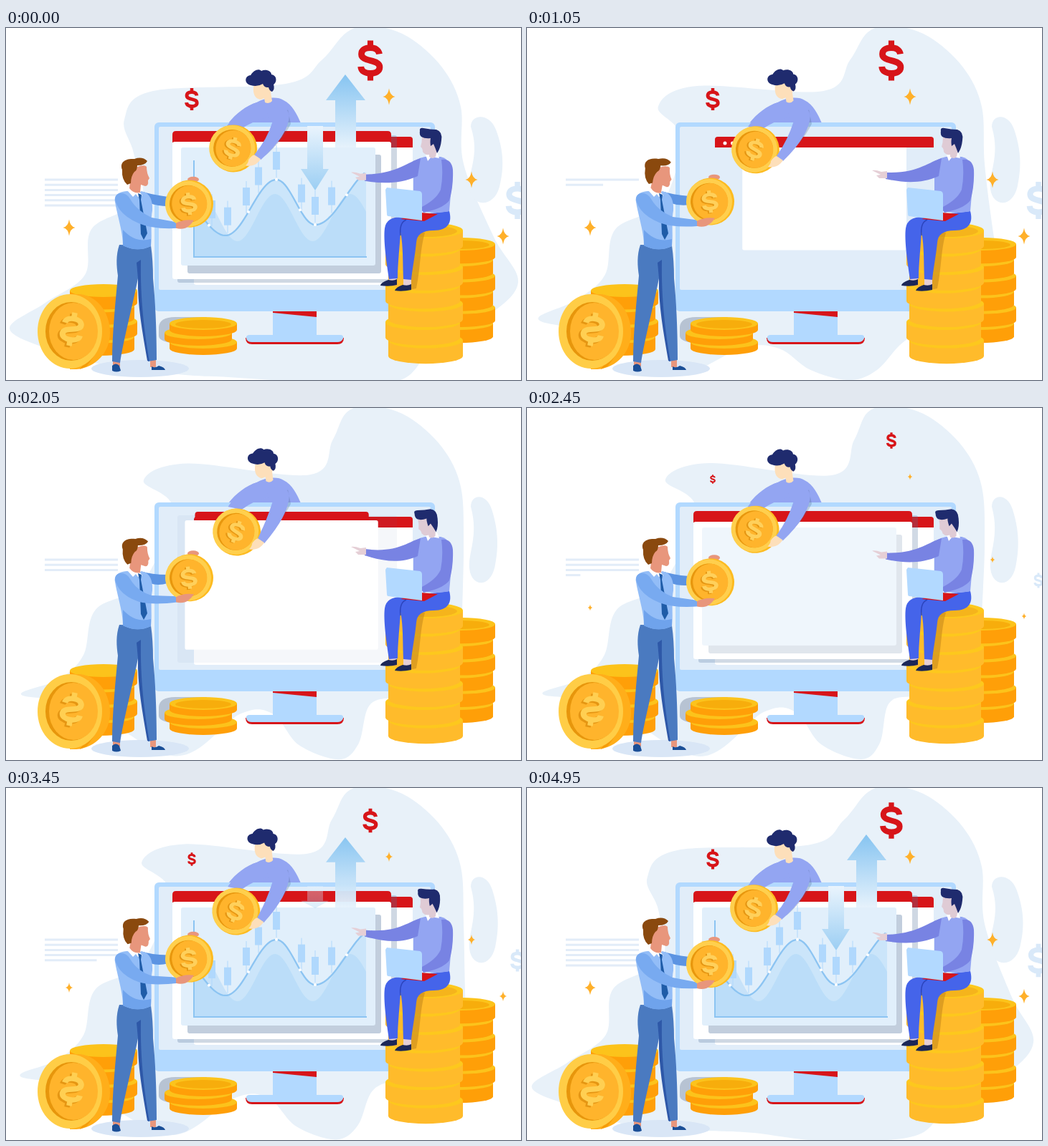
An HTML page for the animation above (5050 ms loop, 718 px wide and 492 px high).

```html
<!DOCTYPE html>
<html lang="en">
<head>
<meta charset="utf-8">
<title>Investment team</title>
<style>
  html, body { margin: 0; width: 100%; height: 100%; overflow: hidden; background: #fff; }
  svg { display: block; width: 718px; height: 492px; }
</style>
</head>
<body>
<svg viewBox="0 0 718 492">
  <defs>
    <g id="dollar" fill="none">
      <path stroke-width="5.4" d="M7.7-5.6C7.2-9.3 4-11 0-11C-4.5-11-7.7-9-7.7-5.6C-7.7-2-4-1 0 0S8 2 8 5.7C8 9.2 4.5 11 0 11C-4.5 11-8 9-8.2 5.2"/>
      <path stroke-width="5" d="M0-17.300v6M0 11.300v6"/>
    </g>
    <path id="star" fill="#ffb02a" d="M0-11.500Q1.300-1.500 8.500 0Q1.300 1.500 0 11.500Q-1.300 1.500-8.500 0Q-1.300-1.500 0-11.500Z"/>
    <g id="coin">
      <circle r="33" cx="1" fill="#fdbb20"/>
      <circle r="32" cx="-1" fill="#ffcf4d"/>
      <circle r="26" cx="-1" fill="#e8970d"/>
      <ellipse rx="24.500" ry="25.500" cx=".8" fill="#ffb42c"/>
      <use href="#dollar" stroke="#e59613" transform="translate(-2 1) scale(1.050 .9)"/>
      <use href="#dollar" stroke="#ffd05b" transform="scale(1.050 .9)"/>
    </g>
    <linearGradient id="upFill" x2="0" y2="1">
      <stop stop-color="#86c4f1"/><stop offset="1" stop-color="#e6f2fc"/>
    </linearGradient>
    <linearGradient id="downFill" x2="0" y2="1">
      <stop stop-color="#eaf4fd"/><stop offset="1" stop-color="#9bcef3"/>
    </linearGradient>
  </defs>

  <path id="blob" fill="#e8f1f9"/>
  <path id="sideBlob" fill="#e8f1f9" d="M648 138C648 120 674 118 683 142C692 166 696 190 688 222C680 252 650 250 646 226C642 204 662 180 648 138Z"/>
  <g id="lines" stroke="#e2ecf8" stroke-width="3"></g>

  <!-- man behind the monitor -->
  <path fill="#93a5f2" d="M350 104C360 97 379 95 387 101C399 107 406 121 411 133H310C320 120 335 108 350 104Z"/>
  <g id="headTop">
    <path fill="#fddfba" d="M345 82C344 92 347 99 355 100L360 98L361 104Q367 107 371 102L369 90L373 84L366 75L347 78Z"/>
    <path fill="#1f2b6e" d="M341 80C332 78 332 67 341 66C345 59 352 56 356 60C362 57 370 60 370 65C378 66 378 76 373 79Q375 86 371 89Q367 88 366 83Q360 84 358 78Q350 83 341 80Z"/>
  </g>

  <!-- monitor -->
  <rect x="207" y="132" width="391" height="264" rx="6" fill="#b2d9ff"/>
  <rect x="213" y="138" width="379" height="228" rx="2" fill="#e1edf9"/>
  <path fill="#d71519" d="M334 433Q334 442 343 442H462Q471 442 471 433Z"/>
  <path fill="#b2d9ff" d="M372 396H433V429H466Q471 429 470 434Q468 439 462 439H343Q336 439 335 434Q334 429 340 429H372Z"/>
  <path fill="#d71519" d="M372 396H433V404L372 398Z"/>

  <!-- rear window -->
  <rect id="rearBody" x="262" y="160" width="305" height="199" rx="3" fill="#fff"/>
  <path id="rearBar" fill="#d71519" d="M262 167V156Q262 152 266 152H563Q567 152 567 156V167Z"/>
  <path id="rearDots" stroke="#fff" stroke-width="5" stroke-linecap="round" d="M276 161h0M286.500 161h0M297 161h0"/>
  <!-- front window -->
  <rect id="frontShade" x="239" y="150" width="306" height="206" rx="3" fill="#52749b"/>
  <path id="frontBar" fill="#d71519" d="M232 160V149Q232 144 237 144H532Q537 144 537 149V160Z"/>
  <rect id="frontBody" x="232" y="159" width="305" height="192" rx="3" fill="#fff"/>
  <g id="panel">
    <rect x="253" y="177" width="270" height="166" rx="3" fill="#c2cedd"/>
    <rect x="244" y="167" width="271" height="165" rx="3" fill="#e1effb"/>
  </g>
  <g id="chart">
    <path id="backArea" fill="#9bcdf5" opacity=".38"/>
    <path id="frontArea" fill="#a7d4f8" opacity=".38"/>
    <g id="candles" fill="#b0d8fd" stroke="#b0d8fd"></g>
    <path fill="none" stroke="#8cc4f2" stroke-width="2" d="M262 185V320H503"/>
    <path id="curve" fill="none" stroke="#8cc4f2" stroke-width="2.300"/>
    <path id="nodes" stroke="#fff" stroke-width="4" stroke-linecap="round"/>
  </g>
  <path id="up" fill="url(#upFill)" d="M473 65L501 101H488V167H459V101H446Z"/>
  <path id="down" fill="url(#downFill)" d="M420 137H442V197H450L431 227L411 197H420Z"/>

  <!-- arms over the frame -->
  <path fill="#46607f" opacity=".25" d="M393 114L397 134C388 152 376 166 362 178L350 180Z"/>
  <path id="armTopLeft" fill="#93a5f2"/>
  <use id="coinTop" href="#coin"/>
  <path id="armTopRight" fill="#93a5f2"/>
  <path id="handTop" fill="#fddfba" d="M346 177L355 183C350 190 344 194 334 192Q338 188 338 184Q342 178 346 177Z"/>

  <!-- coin piles and seated man -->
  <path fill="#b7c3d3" d="M213 418Q214 404 236 404H280V440H232Q213 438 213 430Z"/>
  <g id="piles"></g>
  <path fill="#c98a1c" opacity=".6" d="M565 284L584 286C577 310 578 335 572 364L562 366Z"/>
  <path fill="#e5cfd6" d="M534 348h11v7h-11ZM554 347h11v13h-11Z"/>
  <path fill="#1c2757" d="M522 360Q522 356 533 352Q540 354 545 351V359Q535 362 522 360ZM542 367Q544 362 553 359Q560 361 565 358V366Q552 369 542 367Z"/>
  <path fill="#4564ea" d="M618 256C622 270 618 283 596 283Q573 283 572 300C570 320 566 340 565 352L554 351C553 330 554 305 550 285C549 305 546 330 546 350L534 351C530 325 526 295 528 280Q530 264 552 264Z"/>
  <path fill="none" stroke="#2c45bd" stroke-width="1.500" d="M550 290Q548 272 558 268"/>
  <path fill="#93a5f2" d="M584 180Q572 182 568 190V228L580 256Q600 260 618 256L622 210Q623 184 606 180Z"/>
  <path id="armPoint" fill="#7883e3"/>
  <path id="handPoint" fill="#e5cfd6" d="M502 203V213L491 213L487 209L493 208L481 202Q486 201 494 204Z"/>
  <path fill="#7883e3" d="M607 184Q621 182 623 198Q624 222 618 241Q610 252 582 258L578 251Q600 240 606 226Q610 205 607 184Z"/>
  <path fill="#fff" d="M585 177L601 174L604 182L593 180L588 186Z"/>
  <g id="headSeat">
    <path fill="#dfcbd5" d="M580 152Q580 160 578 166Q581 168 581 173Q584 178 590 177V180Q595 184 599 180L603 160L594 150Z"/>
    <path fill="#1f2b6e" d="M577 144Q576 139 582 140Q592 142 600 142Q609 145 607 157Q606 168 601 175Q599 169 596 162L592 165Q591 158 592 154Q584 155 579 152Q576 149 577 144Z"/>
  </g>
  <path fill="#d71519" d="M578 258L602 260L583 270L550 267Z"/>
  <path fill="#b2d9ff" d="M531 223L577 228Q580 229 580 233V269L533 263Q531 263 531 260L529 226Z"/>

  <!-- large coin -->
  <g id="leftPile"></g>
  <path fill="#ffae1a" d="M89 372H104C130 376 145 400 145 426S126 475 98 477H89Z"/>
  <path fill="#f59c08" d="M108 377C137 395 142 440 112 473L103 477Q135 432 108 377Z"/>
  <ellipse cx="89" cy="424" rx="45" ry="52" fill="#ffcd46"/>
  <ellipse cx="91" cy="424" rx="36" ry="41" fill="#e7960c"/>
  <ellipse cx="94" cy="424" rx="34" ry="40" fill="#ffb42c"/>
  <use href="#dollar" stroke="#e59613" transform="translate(89 423) rotate(10) scale(-1.500 1.350)"/>
  <use href="#dollar" stroke="#ffcf52" transform="translate(92 421) rotate(10) scale(-1.500 1.350)"/>

  <!-- standing man -->
  <ellipse cx="187" cy="476" rx="68" ry="12" fill="#d9e6f6"/>
  <path fill="#e8967c" d="M149 464h10v9h-10ZM201 460h8v14h-8Z"/>
  <path fill="#1b4f97" d="M148 472Q153 467 158 472L160 479Q154 482 148 479ZM203 473Q208 476 213 472Q221 474 222 478H203Z"/>
  <path fill="#4a7ac0" d="M158 303C153 318 154 332 156 346C153 380 148 425 148 466L159 468C164 435 176 390 184 350C185 385 192 430 198 466L210 464C210 420 208 380 205 350Q205 325 202 304Z"/>
  <path fill="#2e58a8" d="M182 328L188 324C187 380 193 425 200 466L197 465C190 425 183 385 184 350Z"/>
  <path id="armFar" fill="#5c94e2"/>
  <path fill="#93bdf7" d="M168 228C157 229 150 234 152 243C155 262 163 285 163 304Q183 314 202 305C204 290 201 270 204 255Q205 235 193 229Z"/>
  <path fill="#6fa3ec" d="M163 282Q180 301 202 295V305Q183 314 163 304Z"/>
  <path fill="#fff" d="M170 228L174 223L187 230L190 234L184 236L181 232L177 236Z"/>
  <path fill="#1f5ca8" d="M184 231L189 233L188 240L197 287L192 296L188 288L186 240Z"/>
  <g id="headStand">
    <path fill="#e8967c" d="M176 203C178 193 193 190 196 194Q196 203 200 210L198 213Q199 221 194 221L188 219L187 230Q178 232 172 224L174 208Z"/>
    <path fill="#8a490e" d="M162 198C158 188 166 182 179 183Q190 179 197 186Q194 192 183 192Q183 199 179 201Q174 207 174 217L169 219Q161 212 162 198Z"/>
  </g>
  <path id="armNear" fill="#78aaf0"/>
  <g id="held">
    <ellipse cx="261" cy="212" rx="8" ry="4" fill="#e8967c"/>
    <use href="#coin" transform="translate(255 246) rotate(-6)"/>
    <path fill="#e8967c" d="M237 273Q248 267 262 269Q257 277 250 280Q243 282 237 280Z"/>
  </g>

  <!-- pulsing signs and sparkles -->
  <g transform="translate(508 45.500) scale(1.620)" stroke="#d71519"><use class="pulse" href="#dollar"/></g>
  <g transform="translate(259 99.500) scale(.9)" stroke="#d71519"><use class="pulse" href="#dollar"/></g>
  <g transform="translate(713 241) scale(1.500)" stroke="#d9e9f9"><use class="pulse" href="#dollar"/></g>
  <g transform="translate(88 279)"><use class="pulse" href="#star"/></g>
  <g transform="translate(534 96)"><use class="pulse" href="#star"/></g>
  <g transform="translate(649 212)"><use class="pulse" href="#star"/></g>
  <g transform="translate(693 291)"><use class="pulse" href="#star"/></g>
</svg>

<script>
const LOOP = 5050, LENGTH = 5000;
const el = id => document.getElementById(id);
const set = (id, name, value) => el(id).setAttribute(name, value);
const move = (id, value) => set(id, 'transform', value);
const fade = (id, value) => set(id, 'opacity', value);
const scaleAt = (id, x, y, sx, sy = sx) =>
  move(id, `translate(${x} ${y}) scale(${sx} ${sy}) translate(${-x} ${-y})`);

const lerp = (a, b, p) => a + (b - a) * p;
const ramp = (t, from, to) => Math.min(1, Math.max(0, (t - from) / (to - from)));
const bump = (t, from, peak, to) => Math.min(ramp(t, from, peak), ramp(t, to, peak));
const smooth = p => p * p * (3 - 2 * p);
const easeOut = p => 1 - (1 - p) ** 2;
const range = (from, to, step = 1) =>
  Array.from({ length: Math.floor((to - from) / step) + 1 }, (_, i) => from + i * step);

// Closed Catmull-Rom curve
function closedCurve(pts) {
  const n = pts.length, at = i => pts[(i + n) % n];
  return 'M' + pts[0] + pts.map((p, i) => {
    const a = at(i - 1), b = at(i + 1), c = at(i + 2);
    return `C${p[0] + (b[0] - a[0]) / 6} ${p[1] + (b[1] - a[1]) / 6} ` +
      `${b[0] - (c[0] - p[0]) / 6} ${b[1] - (c[1] - p[1]) / 6} ${b}`;
  }).join('') + 'Z';
}

const points = text => text.split(' ').map(pair => pair.split(',').map(Number));
const crest = '475,6 510,-3 560,12 608,55 634,110 638,190 ';
const wide = points(crest + '680,292 714,355 672,402 600,440 555,490 480,496 420,494 370,492 310,488 250,485 150,474 60,449 5,420 55,384 110,345 120,280 188,240 178,175 165,128 205,88 390,78 440,45');
const narrow = points(crest + '634,290 632,345 620,390 545,402 505,412 492,468 466,491 410,470 375,425 330,425 240,487 110,415 22,400 75,379 108,345 125,282 190,245 235,140 193,100 255,77 425,94 456,45');

// Chart: a wave eased between its turning points
const turns = points('235,230 306,290 377,212 431,275 516,196');
function wave(x) {
  const i = turns.findIndex(p => p[0] > x), [x0, y0] = turns[i - 1], [x1, y1] = turns[i];
  return lerp(y0, y1, (1 - Math.cos(Math.PI * ramp(x, x0, x1))) / 2);
}
const hills = x => 265 - 33 * Math.cos((x - 375) / 105 * 2 * Math.PI);
const plot = (f, from, to) => range(from, to, 3).map(x => `${x} ${f(x)}`).join('L');
const dots = xs => xs.map(x => `M${x} ${wave(x)}h0`).join('');

set('curve', 'd', 'M' + plot(wave, 272, 500));
set('frontArea', 'd', `M262 320L${plot(wave, 262, 502)}V320Z`);
set('backArea', 'd', `M262 320L${plot(hills, 262, 502)}V320Z`);
set('nodes', 'd', dots([283, 338, 377, 410, 431, 475]));
el('candles').innerHTML = [287, 309, 335, 352, 377, 412, 431, 454].map(x => {
  const y = wave(x) - 39;
  return `<path d="M${x} ${y - 9}v45"/><rect x="${x - 5}" y="${y}" width="10" height="25" stroke="none"/>`;
}).join('');

// Coins stacked downwards; every other one is nudged sideways
function pile(x, top, count, step, nudge, { rx, ry, side, rim, face }) {
  return range(0, count - 1).map(i => {
    const y = top + i * step, cx = x + i % 2 * nudge;
    return `<path fill="${side}" d="M${cx - rx} ${y}v${step - 4}a${rx} ${ry} 0 0 0 ${2 * rx} 0V${y}Z"/>` +
      `<ellipse cx="${cx}" cy="${y}" rx="${rx}" ry="${ry}" fill="${rim}"/>` +
      (i ? '' : `<ellipse cx="${cx}" cy="${y + 1}" rx="${rx - 8}" ry="${ry - 3}" fill="${face}"/>`);
  }).reverse().join('');
}
const orange = { rx: 47, ry: 9, side: '#ff9f08', rim: '#fcc31b', face: '#f7ad0c' };
const amber = { rx: 52, ry: 11, side: '#ffbb2b', rim: '#fdc81d', face: '#f5b41c' };
el('piles').innerHTML = pile(275, 413, 3, 13, -7, orange) +
  pile(635, 302, 6, 22.2, -3, orange) + pile(585, 283, 7, 25.6, -4, amber);
el('leftPile').innerHTML = pile(136, 367, 4, 21.5, -4, { ...orange, face: orange.rim });

el('lines').innerHTML = '<path/>'.repeat(6);
const lines = [...el('lines').children];
const pulsing = document.querySelectorAll('.pulse');

function drawBackground(t) {
  const w = Math.sin(Math.PI * t / LENGTH) ** .85;
  set('blob', 'd', closedCurve(wide.map(([x, y], i) => [lerp(x, narrow[i][0], w), lerp(y, narrow[i][1], w)])));
  scaleAt('sideBlob', 648, 185, 1 - .17 * w, 1);
  lines.forEach((line, i) => {
    const start = i * 770;
    line.setAttribute('d', `M54 ${212 + i * 7.2}h${102 * ramp(t, start, start + 450)}`);
  });
  const pulse = 1 - Math.abs(t / 1000 % 2 - 1);
  pulsing.forEach(node => node.setAttribute('transform', `scale(${pulse})`));
}

function drawScreen(t) {
  scaleAt('rearDots', 276, 161, easeOut(ramp(t, 400, 700)));
  scaleAt('rearBar', 415, 160, easeOut(ramp(t, 520, 950)), ramp(t, 520, 700));
  scaleAt('rearBody', 415, 165, easeOut(ramp(t, 750, 1250)));

  const grow = ramp(t, 1500, 2260), size = easeOut(grow);
  fade('frontShade', .28 * smooth(ramp(t, 1800, 2500)));
  scaleAt('frontBar', 385, 152, grow ** .55, size);
  scaleAt('frontBody', 381, 124, size, (1 + size) / 2);
  fade('panel', ramp(t, 2200, 2600));
  fade('chart', ramp(t, 2500, 3000));

  const rise = easeOut(ramp(t, 3000, 3500)), fall = easeOut(ramp(t, 3300, 3800));
  fade('up', rise);
  scaleAt('up', 473, 167, 1, rise);
  fade('down', fall);
  scaleAt('down', 431, 137, 1, fall * lerp(.955, 1, ramp(t, 4000, 4900)));
}

function drawPeople(t) {
  // Two sways after a short rest
  const sway = Math.sin(Math.PI * Math.max(0, t - 600) / 2150) ** 2;

  const lift = 11 * sway;
  const nod = bump(t, 0, 550, 2400) + bump(t, 2900, 4000, 4850);
  move('held', `translate(0 ${-lift})`);
  move('headStand', `rotate(${7 * nod} 181 228)`);
  set('armFar', 'd', `M188 228Q202 233 226 ${236 - lift / 3}V${249 - lift / 2}Q212 249 201 245Z`);
  set('armNear', 'd', `M152 240C152 228 167 228 173 239Q183 256 203 ${265 - lift / 3}L240 ${272 - lift}V${280 - lift}` +
    `Q205 ${282 - lift * .7} 185 ${273 - lift / 4}Q157 261 152 240Z`);

  const d = 6.5 * sway;
  move('headTop', `translate(${sway * 2} ${-sway * 2}) rotate(${sway * 3} 362 100)`);
  move('coinTop', `translate(${316 + d} ${168 + d}) rotate(${14 + sway * 6})`);
  move('handTop', `translate(${d} ${d})`);
  set('armTopLeft', 'd', `M352 103Q326 112 ${307 + d / 2} 138L${326 + d / 2} 142Q344 130 368 124Z`);
  set('armTopRight', 'd', `M372 112Q390 104 395 122Q394 150 ${355 + d} ${184 + d}L${346 + d} ${177 + d}Q364 156 372 130Z`);

  const reach = 10 * sway;
  set('armPoint', 'd', `M578 182C560 187 545 ${204 - reach / 8} 500 ${205 - reach}V${214 - reach}` +
    `C525 ${218 - reach / 2} 550 218 574 207Z`);
  move('handPoint', `translate(0 ${-reach})`);
  const bow = ramp(t, 1500, 1950) - ramp(t, 2850, 3700);
  move('headSeat', `rotate(${-12 * bow} 592 181)`);
}

function draw(now) {
  const t = Math.min(LENGTH, (now + LENGTH) % LOOP);
  drawBackground(t);
  drawScreen(t);
  drawPeople(t);
}

let start;
function tick(now) {
  start ??= now;
  draw(now - start);
  requestAnimationFrame(tick);
}
draw(0);
requestAnimationFrame(tick);
</script>
</body>
</html>
```
